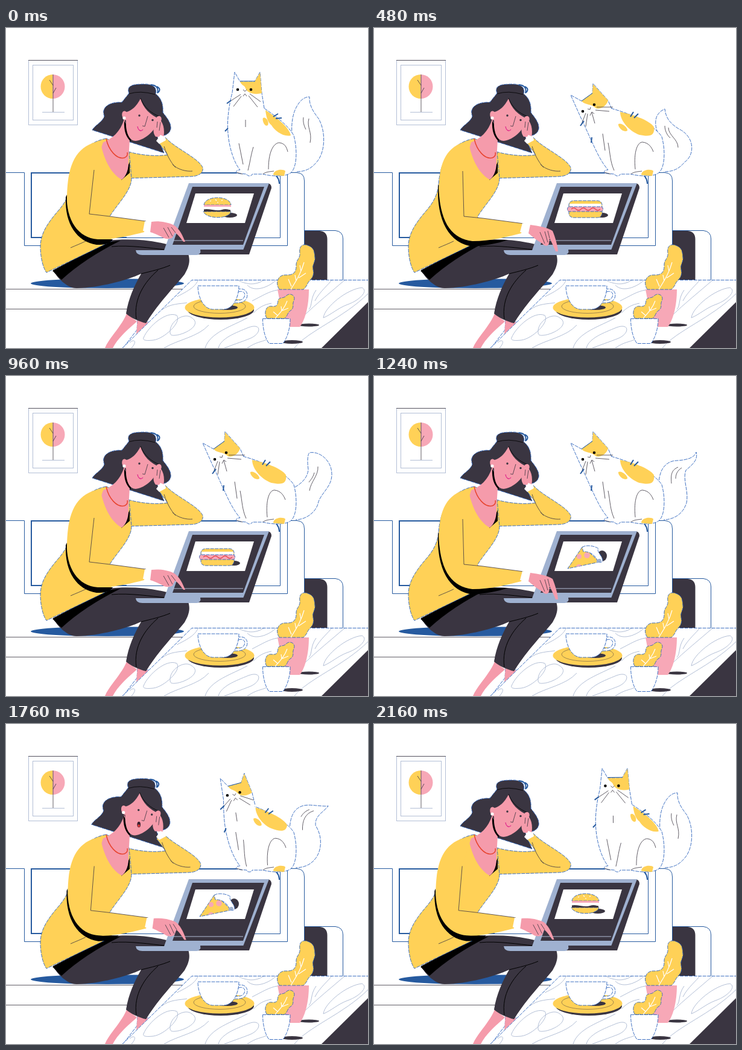
An HTML page for the animation above (2240 ms loop, 600 px wide and 530 px high).

```html
<!DOCTYPE html>
<html lang="en">
<head>
<meta charset="utf-8">
<title>Evening on the sofa</title>
<style>
html, body { margin: 0; width: 100%; height: 100%; overflow: hidden; background: #fff; }
svg { display: block; width: 100vw; height: 100vh; }
.y { fill: #ffd157; } .d { fill: #3a3541; } .p { fill: #f7a8b7; } .s { fill: #f59bab; }
.w { fill: #fff; } .k { fill: #000; } .g { fill: #9fb1d0; } .b { fill: #265a9f; }
.out { stroke: #2c62bb; stroke-width: .9; stroke-dasharray: 6 1.5; }
.ink { fill: none; stroke: #3a3541; stroke-width: .8; }
.line { fill: none; stroke: #265a9f; stroke-width: 1; }
.thick { stroke-width: 2; }
.pale { fill: none; stroke: #b3bfd6; stroke-width: 1; }
.vein { fill: none; stroke: #fff; stroke-width: 1.2; }
</style>
</head>
<body>
<svg viewBox="0 0 600 530">
  <!-- wall picture -->
  <rect class="pale" x="37.5" y="53.5" width="81" height="107"/>
  <path class="ink" d="M37 53.5H119"/>
  <rect class="pale" x="44.5" y="61.5" width="67" height="91"/>
  <path class="y" d="M77.5 77a20 20 0 0 0 0 40z"/>
  <path class="p" d="M77.5 77a20 20 0 0 1 0 40z"/>
  <path class="ink" d="M78 77V140M72 86L78 95M78 108L83 99"/>
  <path class="pale" d="M60 139.5H97"/>

  <!-- sofa -->
  <path class="line" d="M0 239.5H30.5V360.5H466.5V239M466 239.5H482Q494.5 240 494.5 253V417"/>
  <path class="line thick" d="M454 240H42V347H200"/>
  <path class="line" d="M200 347.500H454.500V240"/>
  <path class="line thick" d="M440 241Q452 243 453 258"/>
  <path class="ink" d="M0 432.5H292M0 465.5H204"/>
  <ellipse class="b" cx="168" cy="423" rx="127" ry="8"/>
  <path class="d" d="M495 336H520Q532.5 337 532.5 350V417H495Z"/>
  <path class="line" d="M495 335.5H546Q558.5 337 558.5 349V417"/>

  <!-- cat -->
  <g id="cat">
    <path id="tail" class="w out"/>
    <path id="fur" class="ink"/>
    <path class="w out" data-by="back"
      data-a="M415 115L428 133C450 148 468 162 477 178C484 205 482 238 468 242C460 246 440 246 426 242L405 242"
      data-b="M380 125L396 134C440 146 468 166 477 180C484 205 482 238 468 242C460 246 440 246 426 242L405 242"/>
    <path class="y" data-by="back"
      data-a="M430 136C444 145 470 164 472 178C460 181 445 170 440 161C433 156 431 145 430 136Z"
      data-b="M408 139C425 142 456 152 464 164C466 180 455 180 440 177C425 172 408 155 408 139Z"/>
    <path class="w out" data-by="lean"
      data-a="M428 133L424 108L421 73L412 89L388 89L379 73L375 107C369 130 366 155 368 175C370 200 379 225 388 235C380 235 379 241 386 241L399 242C399 246 408 246 408 242"
      data-b="M394 134L388 120L363 92L362 108L344 121L326 111L343 149C350 163 356 178 362 190C369 206 378 224 388 235C380 235 379 241 386 241L399 242C399 246 408 246 408 242"/>
    <path class="y" data-by="lean"
      data-a="M388 89L412 89L421 74L424 108C412 111 400 108 397 100C395 94 391 96 388 89Z"
      data-b="M344 121L362 108L363 93L388 120C385 130 375 135 368 133C360 125 350 128 344 121Z"/>
    <path class="y" data-by="back"
      data-a="M426 149C430 146 437 155 434 161C429 165 424 153 426 149Z"
      data-b="M405 159C410 156 421 165 420 170C413 174 404 164 405 159Z"/>
    <path class="y" d="M443 243.5C443 234 460 233 463 237L461 245Z"/>
    <path class="ink" data-by="back"
      data-a="M435 234C435 200 446 190 453 190C462 191 465 197 467 205M410 197C406 210 405 220 401 236M386 191L393 226M382 239L392 242M426 242C430 238 438 238 444 237"
      data-b="M433 234C430 204 437 189 445 189C455 190 460 197 463 205M388 190C392 210 391 220 398 236M379 175L383 203M382 239L392 242M426 242C430 238 438 238 444 237"/>
    <path class="ink" data-by="lean"
      data-a="M397 152L397 164M393 102L396 105L399 102M393 113L396 109L399 113M389 110L372 121M390 113L377 130M402 112L417 131M404 109L422 122"
      data-b="M361 140L366 158M354 134L358 135L359 131M358 145L361 139L365 142M351 141L344 159M354 142L351 163M367 136L390 138M369 131L396 131"/>
    <path class="k" data-by="lean"
      data-a="M381.7 102A2.3 2.3 0 1 0 386.3 102A2.3 2.3 0 1 0 381.7 102ZM403.7 102A2.3 2.3 0 1 0 408.3 102A2.3 2.3 0 1 0 403.7 102Z"
      data-b="M343.7 138A2.3 2.3 0 1 0 348.3 138A2.3 2.3 0 1 0 343.7 138ZM362.7 127A2.3 2.3 0 1 0 367.3 127A2.3 2.3 0 1 0 362.7 127Z"/>
    <path class="line thick" data-by="lean"
      data-a="M366 125L373 120M363 171L368 166" data-b="M342 162L348 154M360 190L361 181"/>
    <path class="line thick" data-by="back"
      data-a="M443 147L451 142M447 150L457 149" data-b="M425 147L430 139M431 149L438 142"/>
    <path class="line" data-by="lean" data-a="M388 88L413 88" data-b="M344 121L362 108"/>
  </g>

  <!-- woman: hair, resting arm, legs -->
  <g class="head">
    <path class="d out" d="M204 108C198 94 215 93 226 93C242 92 251 97 248 109C257 116 261 126 260 140C268 150 274 158 273 167C271 178 258 180 250 178L262 207L143 169C148 160 160 156 163 146C157 131 172 122 192 123Z"/>
    <path class="line thick" d="M240 94Q254 95 251 108M250 97Q258 101 252 107"/>
    <path class="ink" style="stroke:#000" d="M204 109Q222 103 247 110"/>
  </g>
  <g id="rest">
    <path class="y out" d="M195 204L203 205C225 211 250 213 268 210L253 190L264 181C278 198 319 215 326 231C328 242 316 246 305 246L198 249Z"/>
    <path class="ink" d="M262 196C267 213 276 226 281 231M276 226C285 235 300 238 309 237"/>
  </g>
  <path class="s" d="M200 473C191 495 170 514 164 530H177C186 512 206 496 217 486Z"/>
  <path class="w out" d="M218 484L217 500L194 530H204L240 488Z"/>
  <path class="s" d="M218 482L236 488L216 507Z"/>
  <path class="d" d="M78 401L170 352C210 347 272 352 302 374C306 386 303 396 296 408C282 426 252 456 232 489C220 486 205 479 199 473C203 448 212 428 224 407C200 418 155 430 118 431C102 432 84 413 78 401Z"/>
  <path class="ink" style="stroke:#000;stroke-width:1" d="M175 362C205 359 240 365 264 367M224 407C240 403 258 399 272 393M216 482C211 448 230 420 252 401"/>
  <path class="k" d="M77 402L168 355L190 352Q130 382 92 417Z"/>

  <!-- woman: torso -->
  <path class="y out" d="M166 183C128 190 108 222 107 262C103 282 96 291 88 301C66 326 57 343 57 362C57 382 62 398 67 405L175 353L172 312C184 292 208 270 208 249L204 205L195 195Z"/>
  <path class="ink" d="M107 364C116 360 124 357 132 353"/>

  <!-- woman: neck and face -->
  <path class="k" d="M205 222L205 240L191 252Z"/>
  <path class="s" d="M196 150L205 185L203 218C204 234 199 246 192 251C172 241 161 212 157 191C176 184 190 172 196 150Z"/>
  <g class="head">
    <path class="k" d="M196 154L205 170L207 188C199 181 195 170 196 154Z"/>
    <path class="s" d="M223 117C216 130 208 137 200 139C191 132 189 150 199 153C198 168 202 187 215 187C232 185 246 170 256 151C239 145 227 132 223 117Z"/>
    <circle class="w" cx="196" cy="149" r="2.6"/>
    <path class="ink" style="stroke:#000" d="M223 116C228 130 240 142 256 147"/>
    <circle class="d" cx="221" cy="145" r="1.7"/>
    <circle class="d" cx="243" cy="152.5" r="1.7"/>
    <path class="ink" d="M235 146L230 163L226 162"/>
    <path id="smile" fill="none" stroke="#e0208a" stroke-width="1.2" d="M218 163C219 170 224 172 227 168"/>
    <g id="gasp"><ellipse cx="221.5" cy="169" rx="2.8" ry="4.8" fill="#3a2030"/><ellipse cx="221.5" cy="171" rx="1.8" ry="2.2" fill="#e33b3b"/></g>
    <path class="s" d="M248 180C240 170 248 157 249 149C253 142 260 147 257 154C262 161 263 172 261 181Z"/>
    <path class="ink" d="M251 155L250 165M256 156L254 170"/>
  </g>
  <path class="w" d="M249 187L256 177L264 181L265 186L254 192Z"/>
  <path fill="none" stroke="#e8442f" stroke-width="1.5" d="M166 183C170 203 184 218 196 215C201 213 202 210 201 206"/>

  <!-- laptop -->
  <path class="d" d="M304 257H434Q440 258 440 265L403 375H318L300 361Z"/>
  <path class="g" d="M303 257H436L393 368H262Z"/>
  <path class="d" d="M309 263H428L393 359H276Z"/>
  <path class="g" d="M215 368H322Q326 375 316 376H226Q216 376 215 368Z"/>
  <path class="d" d="M322 367H394L404 366L401 375H319Q324 372 322 367Z"/>
  <path class="pale" d="M276 352H393"/>
  <path class="w" d="M314 274H411L396 323H299Z"/>
  <g class="food">
    <ellipse class="d" cx="371" cy="310" rx="12" ry="4"/>
    <path class="y out" d="M328 293C330 277 371 277 373 293ZM327 304H373C370 317 332 317 327 304Z"/>
    <path class="p" d="M328 293H373V297H328Z"/>
    <path class="d" d="M328 299H372V304H328Z"/>
    <path class="w" d="M328 296H372C377 299 375 302 370 301Q363 299 358 301T342 301T326 301Q322 298 328 296Z"/>
    <path class="vein" d="M338 287l2 -1M347 284l2 2M357 286l2 -1M350 289l2 0"/>
  </g>
  <g class="food">
    <ellipse class="d" cx="378" cy="310" rx="10" ry="4"/>
    <path class="y out" d="M323 296Q322 287 330 286H371Q379 287 378 296ZM323 303H378Q379 314 370 314H331Q322 314 323 303Z"/>
    <path class="w" d="M324 291H377V297H324Z"/>
    <rect class="p out" x="320.5" y="296" width="59" height="8" rx="3.5"/>
    <path fill="none" stroke="#e84a52" stroke-width="1.2" d="M327 300q4 -4 8 0t8 0t8 0t8 0t8 0t8 0"/>
  </g>
  <g class="food">
    <ellipse class="d" cx="378" cy="298" rx="8" ry="9"/>
    <path class="y out" d="M321 319L346 282L374 308Z"/>
    <g class="p"><circle cx="340" cy="299" r="4"/><circle cx="353" cy="297" r="4.8"/><path d="M335 316a5 5 0 0 1 9 -2z"/></g>
    <path class="w out" d="M345 284C350 279 366 281 372 286C368 290 379 298 379 306C377 310 372 309 370 306C368 298 358 290 347 291Z"/>
    <path class="g" d="M369 309a4.5 4.5 0 0 1 8 -4l-1 3z"/>
  </g>

  <!-- typing arm -->
  <path class="k" data-by="arm"
    data-a="M101 276C99 318 120 348 152 350L177 350C172 358 164 359 150 359C118 354 97 325 99 280Z"
    data-b="M107 258C108 318 126 348 160 351L222 351C205 357 185 360 165 362C124 358 104 318 106 262Z"/>
  <path class="y" data-by="arm"
    data-a="M162 186C118 192 102 222 101 280C103 325 126 349 160 350C185 349 210 343 229 338L232 320L172 312L138 308L146 235Z"
    data-b="M162 186C122 192 108 220 108 264C109 320 130 350 163 353C195 353 220 346 244 340L248 324L180 315L149 312L147 237Z"/>
  <path class="ink" data-by="arm"
    data-a="M146 235L138 308L172 312L232 320" data-b="M147 237L149 312L180 315L248 324"/>
  <path class="w" data-by="arm"
    data-a="M230 320L243 321L240 339L227 336Z" data-b="M246 323L262 327L258 341L242 338Z"/>
  <path class="s" data-by="arm"
    data-a="M241 321C255 319 270 322 279 327C289 334 293 345 297 354L294 354C289 347 284 341 280 339L276 347C270 351 262 349 258 346C252 343 246 340 239 338Z"
    data-b="M259 326C273 328 287 330 296 336C301 348 304 360 305 370L301 370C297 360 293 352 291 348L290 357C288 363 282 361 279 357C270 352 263 346 256 340Z"/>
  <path class="ink" data-by="arm"
    data-a="M261 331L270 347M268 330L276 345M281 339L274 330" data-b="M275 338L283 357M283 337L288 355M291 348L288 336"/>

  <!-- coffee table -->
  <path class="w" d="M308 417H600V530H193Z"/>
  <g id="grain" class="pale">
    <path d="M283 445C310 432 314 426 319 417M228 513C236 494 266 468 283 476C292 487 262 515 244 517C234 518 226 518 228 513M205 521C214 514 217 520 208 530M258 467C272 456 290 457 300 455"/>
    <path d="M272 505C270 486 296 470 308 480C326 492 296 508 280 509Q272 510 272 505M262 530C285 516 318 512 336 492M330 530C338 504 375 494 400 480M352 530C356 514 380 505 402 496C424 488 424 506 405 514C390 520 372 526 362 530"/>
    <path d="M383 417C396 424 412 428 428 417M400 426C414 440 440 426 448 417M408 452C424 444 436 436 450 434M410 472C420 462 428 458 440 456M492 478C515 456 540 436 562 417M512 452C520 436 536 424 540 417M502 466C508 460 504 448 514 434M526 480C528 462 566 432 590 430C602 436 584 452 566 458C550 464 540 474 526 480M478 530C500 502 560 480 600 440M400 530C414 520 424 520 432 516"/>
  </g>
  <path class="out" fill="none" d="M193 530L308 417.5H600"/>
  <path class="d" d="M600 454V530H523Z"/>

  <!-- cup -->
  <ellipse class="d" cx="356" cy="467" rx="55" ry="16"/>
  <ellipse class="y" cx="354" cy="463" rx="57.5" ry="16.5"/>
  <ellipse class="ink" cx="354" cy="461" rx="43" ry="11.5" opacity=".6"/>
  <ellipse class="d" cx="367" cy="463" rx="17" ry="4"/>
  <path class="w out" fill-rule="evenodd" d="M383 433C397 429 402 439 399 447C396 455 386 456 376 455ZM385 437C395 434 398 441 394 447C391 451 386 451 381 451Z"/>
  <path class="w out" d="M318 427H386C386 447 376 466 360 466H342C328 465 318 447 318 427Z"/>

  <!-- plants -->
  <ellipse class="d" cx="502" cy="492" rx="17" ry="2.5"/>
  <path class="p" d="M450 433H502C502 460 496 483 487 495H462Z"/>
  <path class="y out" d="M453 433C446 423 450 409 463 409C477 410 481 404 481 394C480 384 488 382 487 373C485 360 493 357 500 360C512 364 511 373 512 380C513 388 507 392 509 400C512 413 504 416 500 423C498 428 496 430 493 433Z"/>
  <path class="vein" d="M472 433C480 420 489 407 494 388M473 428L468 416M481 419L479 409M485 414L497 406M489 403L487 393"/>
  <ellipse class="d" cx="474" cy="520" rx="18" ry="3"/>
  <path class="y out" d="M432 481C427 471 431 459 441 461C451 462 450 456 451 451C453 445 460 449 465 443C471 438 481 443 477 452C474 458 478 462 473 467C466 471 467 477 462 481Z"/>
  <path class="vein" d="M446 481C454 472 462 464 466 452M450 476L443 470M457 469L456 461M458 468L468 464"/>
  <path class="w out" d="M425.5 481.5H471C471 500 465 515 459 522.5H436C430 515 425.5 500 425.5 481.5Z"/>
</svg>
<script>
const LOOP = 2240, STEP = 40, TAP = LOOP / 3;
const $ = (q) => document.querySelector(q), $$ = (q) => [...document.querySelectorAll(q)];
const number = /-?\d+(\.\d+)?/g;

// Blend two path strings of equal structure.
function mix(a, b, k) {
  const to = b.match(number);
  let i = 0;
  return a.replace(number, (n) => +(+n + (to[i++] - n) * k).toFixed(2));
}

// Find the surrounding keys and an eased fraction between them.
function span(keys, t) {
  let i = keys.findIndex((key) => key[0] > t);
  if (i < 0) i = keys.length - 1;
  const [t0, a] = keys[i - 1], [t1, b] = keys[i];
  const k = Math.min(1, (t - t0) / (t1 - t0));
  return [a, b, k * k * (3 - 2 * k)];
}
function value(keys, t) {
  const [a, b, k] = span(keys, t);
  return a + (b - a) * k;
}

const armKeys = [[0, 0], [210, 0], [400, 1], [530, 1], [720, 0], [747, 0]];
const leanKeys = [[0, 0], [80, 0], [440, 1], [1360, 1], [1680, .45], [1920, .45], [2190, 0], [LOOP, 0]];
const backKeys = [[0, 0], [80, 0], [440, 1], [1420, 1], [1680, .75], [1920, .75], [2190, 0], [LOOP, 0]];
const shockKeys = [[0, 0], [1280, 0], [1440, 1], [1760, 1], [1900, 0], [LOOP, 0]];

const tail = {
  up: "M474 178C472 150 478 135 485 125C490 118 496 114 503 114C502 130 512 142 518 150C530 170 530 205 515 222C505 234 495 238 480 238",
  curled: "M474 180C464 165 466 150 470 144C474 138 478 136 482 134C484 152 494 160 505 167C532 180 532 210 515 222C505 234 495 238 480 238",
  wide: "M479 184C490 178 500 168 501 155C499 140 500 130 503 127C520 124 540 140 540 163C540 185 520 195 517 212C512 228 495 238 480 238",
  far: "M477 183C490 172 500 160 506 150C510 142 518 132 522 124C537 128 548 142 545 155C535 178 522 190 519 210C512 230 495 238 480 238",
  hook: "M472 180C472 155 484 140 503 140C518 139 531 136 534 126C538 140 525 149 517 156C511 172 522 190 518 210C512 230 495 238 480 238",
  flat: "M470 168C473 143 485 133 507 135C522 137 530 139 537 138C530 147 512 152 513 170C523 186 523 205 516 218C508 232 495 238 480 238",
  rise: "M474 178C472 150 476 138 483 128C490 120 500 116 510 117C502 132 507 145 514 152C530 170 529 205 515 222C505 234 495 238 480 238"
};
const fur = {
  up: "M502 150C498 165 508 172 504 190M493 148C492 156 494 162 497 168",
  curled: "M488 165C488 178 504 184 504 198M482 162C482 170 486 178 491 182",
  wide: "M517 150C518 165 505 175 503 190M511 160C509 168 505 172 502 176",
  hook: "M504 151C492 156 492 165 493 178M510 152C502 157 500 164 500 170",
  flat: "M511 143C496 146 489 158 490 174M504 141C496 143 491 148 488 152"
};
const tailKeys = [[0, "up"], [80, "up"], [480, "curled"], [640, "curled"], [960, "wide"], [1080, "far"],
  [1240, "hook"], [1520, "flat"], [1720, "flat"], [1920, "rise"], [2160, "up"], [LOOP, "up"]];
const furOf = (name) => fur[name] || (name === "far" ? fur.wide : fur.up);

const morphs = $$("[data-by]"), heads = $$(".head"), foods = $$(".food");

function draw(now) {
  const t = Math.floor((now % LOOP) / STEP) * STEP;
  const pose = { arm: value(armKeys, t % TAP), lean: value(leanKeys, t), back: value(backKeys, t) };
  const shock = value(shockKeys, t);

  for (const el of morphs) el.setAttribute("d", mix(el.dataset.a, el.dataset.b, pose[el.dataset.by]));

  const [from, to, k] = span(tailKeys, t);
  $("#tail").setAttribute("d", mix(tail[from], tail[to], k));
  $("#fur").setAttribute("d", mix(furOf(from), furOf(to), k));

  for (const el of heads) el.setAttribute("transform", `translate(${-1.3 * shock} ${-2.5 * shock})`);
  $("#rest").setAttribute("transform", `translate(${-3.5 * shock} 0)`);
  $("#smile").style.display = shock > .5 ? "none" : "";
  $("#gasp").style.display = shock > .5 ? "" : "none";

  const dish = Math.floor((t + TAP - 450) / TAP) % 3;
  foods.forEach((el, i) => el.style.display = i === dish ? "" : "none");
  requestAnimationFrame(tick);
}
const start = performance.now();
function tick() { draw(performance.now() - start); }
tick();
</script>
</body>
</html>
```
